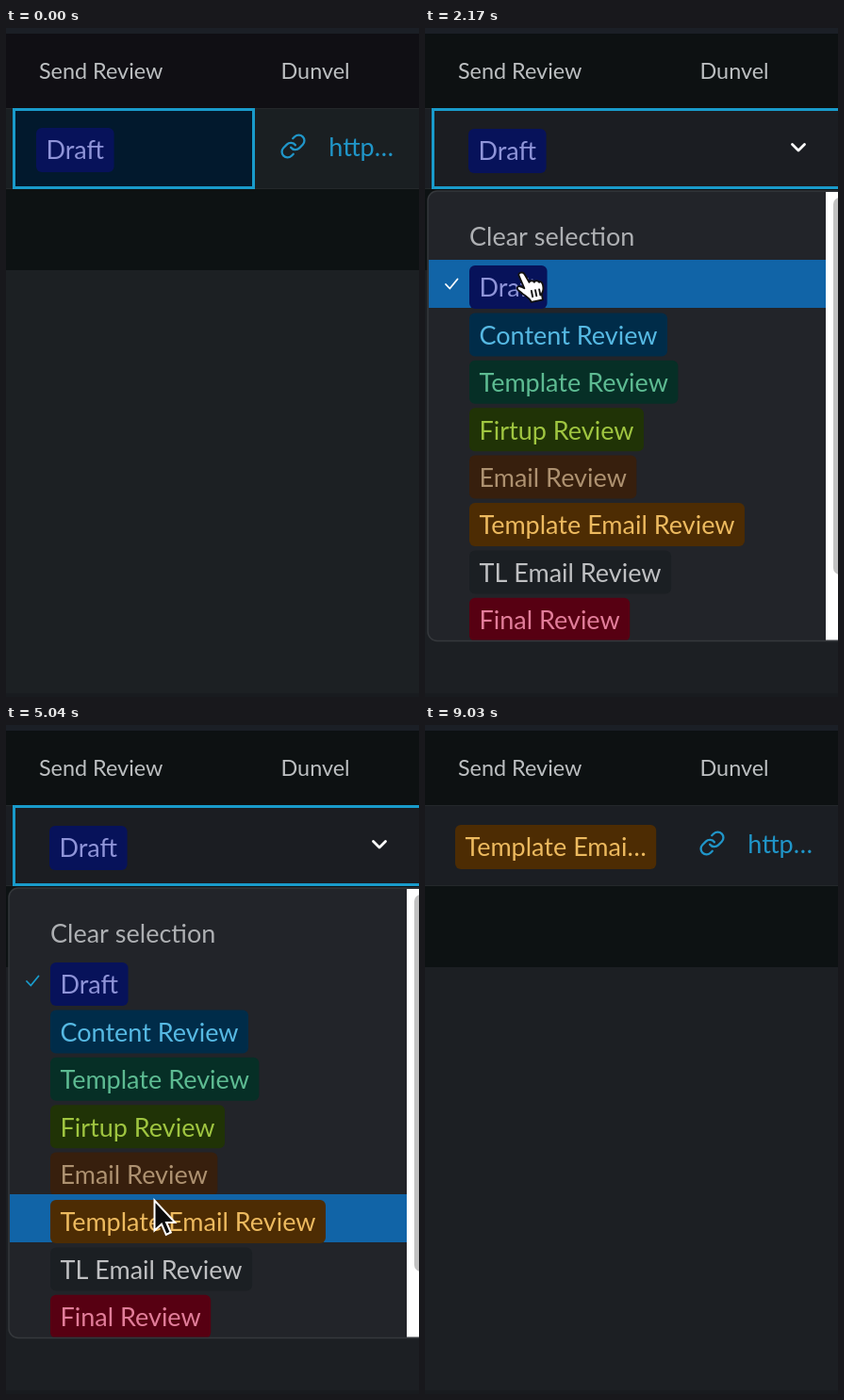
An HTML page with a canvas for the animation above (9100 ms loop, 438 by 710 pixels).

```html
<!DOCTYPE html>
<html lang="en">
<head>
<meta charset="utf-8">
<title>Review status picker</title>
<style>
html, body { margin: 0; width: 100%; height: 100%; overflow: hidden; background: #1c1f23; }
canvas { display: block; width: 438px; height: 710px; }
</style>
</head>
<body>
<canvas id="stage" width="438" height="710"></canvas>
<script>
const ctx = document.getElementById('stage').getContext('2d');
const LOOP = 9100, TICK = 70;
const BODY = '27px Lato, sans-serif', HEAD = '23.4px Lato, sans-serif';
const BLUE = '#199bcb', ROW_TOP = 246, ROW_STEP = 50.4;

const OPTIONS = [
  ['Draft', '#07125a', '#8f94d8'],
  ['Content Review', '#002c49', '#56b9e3'],
  ['Template Review', '#062f26', '#5dbb92'],
  ['Firtup Review', '#203306', '#9fc540'],
  ['Email Review', '#371f0d', '#ad9170'],
  ['Template Email Review', '#4d2c03', '#edba5f'],
  ['TL Email Review', '#1b1f23', '#bfc0c2'],
  ['Final Review', '#570012', '#e27d9a']
];

const ARROW = new Path2D('M0 0V32L7.5 25.2L12.3 36.3L17.3 34L12.6 23.5H21.8Z');
const HAND = new Path2D('M-2 2C-2-1 3-1 4 2L7 11C8 9 12 10 12 12C13 10 16 11 17 13C19 12 20 14 20 17C20 21 19 23 17 25V31H5C5 28 2 25-2 21C-4 18-7 16-6 14C-5 12-2 13 1 16Z');
const FINGERS = new Path2D('M7.5 20V26M11.5 20V26M15.5 20V26');
const LINK = new Path2D('M10 13a5 5 0 0 0 7.54.54l3-3a5 5 0 0 0-7.07-7.07l-1.72 1.71M14 11a5 5 0 0 0-7.54-.54l-3 3a5 5 0 0 0 7.07 7.07l1.71-1.71');

const clamp = v => Math.max(0, Math.min(1, v));
const mix = (a, b, k) => a + (b - a) * k;
const easeIn = k => k * k;
const easeOut = k => 1 - (1 - k) * (1 - k);
const easeBoth = k => k * k * (3 - 2 * k);

function box(x, y, w, h, color) {
  ctx.fillStyle = color;
  ctx.fillRect(x, y, w, h);
}

function pill(x, y, w, h, r, color) {
  ctx.fillStyle = color;
  ctx.beginPath();
  ctx.roundRect(x, y, w, h, r);
  ctx.fill();
}

function text(str, x, y, color, font = BODY) {
  ctx.font = font;
  ctx.fillStyle = color;
  ctx.fillText(str, x, y);
}

function line(points, color, width) {
  ctx.strokeStyle = color;
  ctx.lineWidth = width;
  ctx.beginPath();
  points.forEach(([x, y]) => ctx.lineTo(x, y));
  ctx.stroke();
}

function chip([label, fill, ink], x, y, h = 46) {
  ctx.font = BODY;
  pill(x, y, ctx.measureText(label).width + 21, h, 6, fill);
  text(label, x + 10.5, Math.round(y + 33.3), ink);
}

function drawTable(early) {
  box(0, 0, 438, 710, early ? '#1c2023' : '#1c1f23');
  box(0, 0, 438, 6, '#1b1f26');
  box(0, 6, 438, 79, early ? '#100f14' : '#0d1112');
  box(0, 85, 438, 86, early ? '#1a1f22' : '#1b1e23');
  box(0, 85, 438, 1, '#24282b');
  box(0, 170, 438, 1, '#24282b');
  box(0, 171, 438, 86, '#0d1213');
  box(0, 706, 438, 4, '#181b1f');
  text('Send Review', 35, 54, '#bcbfc1', HEAD);
  text('Dunvel', 291.5, 54, '#bcbfc1', HEAD);
}

function drawLink() {
  ctx.save();
  ctx.translate(290.1, 111.1);
  ctx.scale(1.2, 1.2);
  ctx.strokeStyle = '#2096c9';
  ctx.lineWidth = 1.9;
  ctx.stroke(LINK);
  ctx.restore();
  text('http…', 342.3, 136, '#2096c9');
}

function frameCell(width, fill) {
  box(7, 85, width, 86, BLUE);
  box(10, 88, width - 6, 80, fill);
}

function drawCell(t) {
  drawLink();
  if (t < 9030) frameCell(257, '#02192d');
  const [, fill, ink] = OPTIONS[5];
  chip(t < 1540 ? OPTIONS[0] : ['Template Emai…', fill, ink], 32, 106, 47);
}

function drawEditor(t) {
  frameCell(450, '#1b1d22');
  chip(OPTIONS[0], 46, 107, 47);
  line([[389.5, 123.5], [396, 130], [402.5, 123.5]], '#fff', 2.8);
  const caretOn = Math.floor((t - 1540) / 525) % 2 === 0;
  if (caretOn && t < 4970) box(35, 111, 2, 33, '#fff');
}

function drawMenu(alpha, hover) {
  ctx.save();
  ctx.globalAlpha = alpha;
  ctx.beginPath();
  ctx.roundRect(3, 173, 460, 477.5, 10);
  ctx.fillStyle = '#222429';
  ctx.fill();
  ctx.strokeStyle = '#35383c';
  ctx.lineWidth = 1.5;
  ctx.stroke();
  ctx.beginPath();
  ctx.rect(4, 174, 434, 475.5);
  ctx.clip();

  text('Clear selection', 47, 231, '#aeb0b3');
  OPTIONS.forEach((option, i) => {
    const y = ROW_TOP + i * ROW_STEP;
    if (i === hover) box(4, Math.round(y), 421, 51, '#1164a7');
    chip(option, 47, y + 6);
  });
  line([[22, 272], [26.3, 276.5], [34.5, 266.5]], hover ? BLUE : '#fff', 1.8);

  box(425, 174, 13, 476, '#fff');
  pill(433, 180, 20, 400, 7, '#c1c1c1');
  ctx.restore();
}

function menuAlpha(t) {
  if (t < 1540 || t >= 5250) return 0;
  if (t < 1890) return mix(0.5, 1, easeOut((t - 1540) / 350));
  return t < 5110 ? 1 : 1 - (t - 5040) / 210;
}

function pointerAt(t) {
  if (t < 1960) {
    const k = easeBoth(clamp((t - 350) / 980));
    return [mix(130, 51.5, k), mix(-42, 125, k)];
  }
  if (t < 2170) {
    const k = easeIn((t - 1960) / 210);
    return [mix(51.5, 104, k), mix(125, 260, k)];
  }
  const k = easeOut(clamp((t - 2170) / 490));
  return [mix(104, 157.5, k), mix(260, t < 4970 ? 511 : 504.5, k)];
}

function drawPointer(t, [x, y]) {
  const alpha = 1 - clamp((t - 8190) / 350);
  if (t < 420 || !alpha) return;
  ctx.save();
  ctx.globalAlpha = alpha;
  ctx.translate(x, y);
  if (t >= 2030 && t < 4970 && y > ROW_TOP) {
    ctx.translate(-3, 0);
    ctx.rotate(-0.2);
    ctx.scale(1.05, 1.05);
    ctx.fillStyle = '#fff';
    ctx.strokeStyle = '#111';
    ctx.lineWidth = 1.8;
    ctx.fill(HAND);
    ctx.stroke(HAND);
    ctx.stroke(FINGERS);
  } else {
    ctx.fillStyle = '#0b0b0c';
    ctx.strokeStyle = '#fff';
    ctx.lineWidth = 2;
    ctx.lineJoin = 'miter';
    ctx.fill(ARROW);
    ctx.stroke(ARROW);
  }
  ctx.restore();
}

function draw(now) {
  const t = Math.floor((now % LOOP) / TICK + 1e-6) * TICK;
  const pointer = pointerAt(t);
  const hover = Math.max(0, Math.floor((pointer[1] - ROW_TOP) / ROW_STEP));
  const alpha = menuAlpha(t);
  ctx.lineCap = ctx.lineJoin = 'round';
  drawTable(t < 420);
  if (t >= 1540 && t < 5110) drawEditor(t);
  else drawCell(t);
  if (alpha) drawMenu(alpha, hover);
  drawPointer(t, pointer);
}

let start;
function loop(now) {
  start ??= now;
  draw(now - start);
  requestAnimationFrame(loop);
}
draw(0);
requestAnimationFrame(loop);
</script>
</body>
</html>
```
